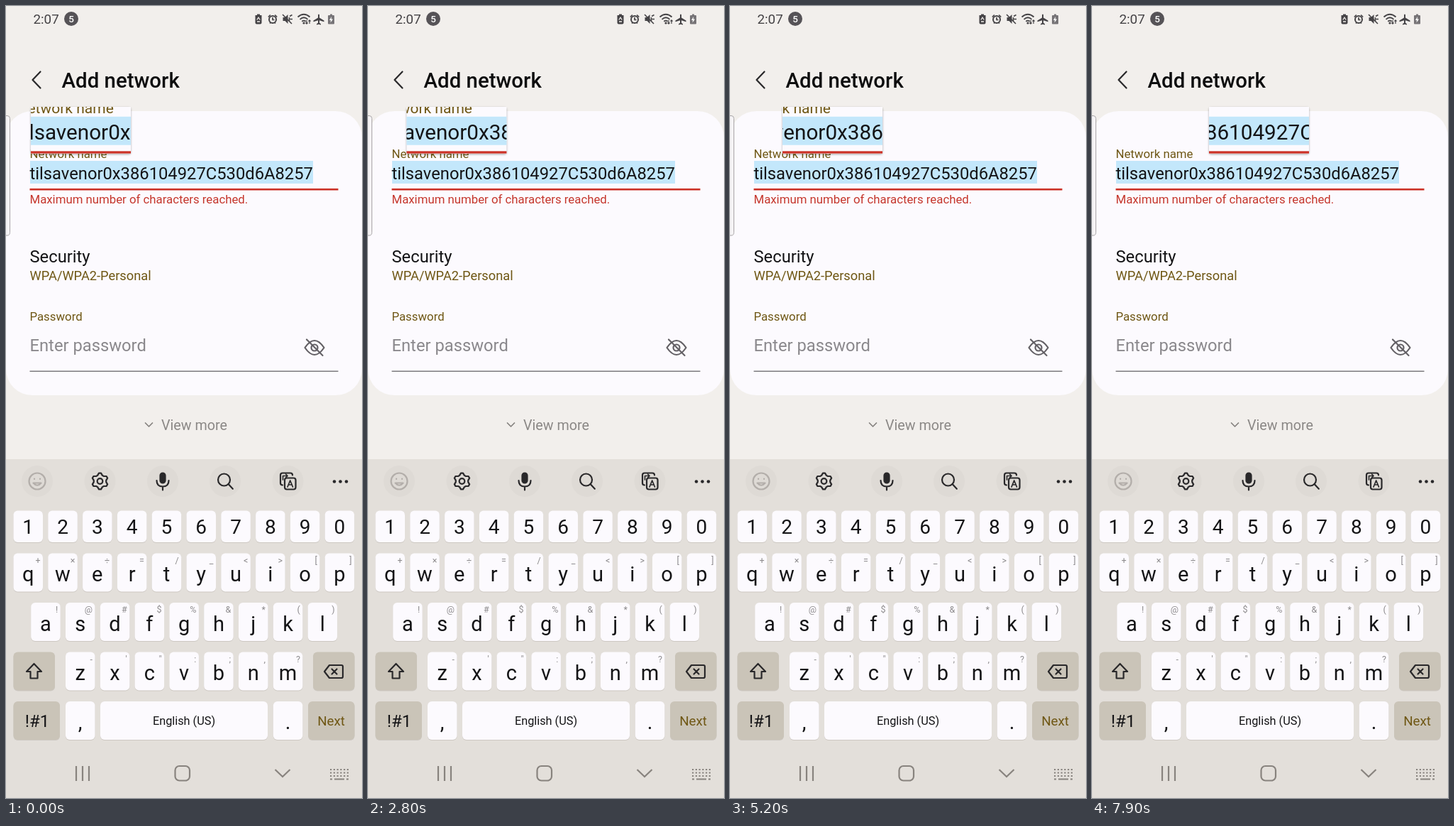
Recreate the animation shown at these times as an HTML page. Size 502 px wide and 1115 px high, loop 8 s.

```html
<!DOCTYPE html>
<html lang="en">
<head>
<meta charset="utf-8">
<title>Add network</title>
<style>
  html, body { margin: 0; width: 100%; height: 100%; overflow: hidden; background: #f2efec; }
  svg { display: block; }
  text { font-family: Roboto, "Noto Sans", sans-serif; fill: #141416; white-space: pre; }
  .mid { text-anchor: middle; }
  .gold { fill: #6f5714; }
  .line { fill: none; stroke: #29282a; stroke-width: 2.2; stroke-linecap: round; stroke-linejoin: round; }
  .thin { stroke-width: 1.7; }
  .nav { fill: none; stroke: #88837e; stroke-width: 2.2; }
  .hint { font-size: 12.5px; fill: #8d8b8d; text-anchor: end; }
  .big { font-size: 23.75px; }
  .small { font-size: 16.8px; }
</style>
</head>
<body>
<svg id="stage" width="502" height="1115" viewBox="0 0 502 1115">
  <defs>
    <filter id="blur" x="-10%" y="-20%" width="120%" height="140%"><feGaussianBlur stdDeviation="1.6"/></filter>
  </defs>
  <rect width="502" height="1115" fill="#f2efec"/>

  <!-- status bar -->
  <text x="38.5" y="24.5" font-size="18.8" style="fill:#454346">2:07</text>
  <circle cx="92" cy="18" r="10" fill="#565357"/>
  <text class="mid" x="92" y="23" font-size="13.5" font-weight="500" style="fill:#fff">5</text>
  <g fill="#454346">
    <path d="M354 11.5h4v2h-4zM351.5 13h9v10.5a2 2 0 0 1-2 2h-5a2 2 0 0 1-2-2z"/>
    <path d="M353.8 19.5l2.2-3.3 2.2 3.3M354 22h4" fill="none" stroke="#f2efec" stroke-width="1.3"/>
    <circle cx="376" cy="19" r="5" fill="none" stroke="#454346" stroke-width="2"/>
    <path d="M376 16v3.5h2.5M369.8 15.5l3-3M382.2 15.5l-3-3M372 24.5l1.5-1.5M380 24.5l-1.5-1.5" fill="none" stroke="#454346" stroke-width="1.7"/>
    <path d="M390.5 16h3l4-4v13l-4-4h-3z"/>
    <path d="M390 12l13 13M400 14.5l3.5-2M400.5 18.5h3.5M399.5 16v6" fill="none" stroke="#454346" stroke-width="1.6"/>
    <path d="M411.5 15.5q8.5-7.5 17 0M414.5 18.8q5.5-5 11 0M417.3 21.8q2.7-2.3 5.4 0" fill="none" stroke="#454346" stroke-width="1.8"/>
    <circle cx="420" cy="24" r="1.6"/>
    <path d="M424 20v5m-1.5-1.5l1.5 1.7 1.5-1.7M428 25v-5m-1.5 1.5l1.5-1.7 1.5 1.7" fill="none" stroke="#454346" stroke-width="1.2"/>
    <path d="M440 12.5c.5-1.5 1.5-1.5 2 0v4l6.5 4v1.7l-6.500-2v3.5l2 1.5v1.3l-3-.8-3 .8v-1.3l2-1.5v-3.5l-6.500 2v-1.7l6.500-4z"/>
    <path d="M457 11.5h3v1.5h2a1 1 0 0 1 1 1v10.5a1 1 0 0 1-1 1h-7a1 1 0 0 1-1-1V14a1 1 0 0 1 1-1h2z" fill="#777477"/>
    <path d="M459 15l-3 5h2l-.5 3.5 3.5-5h-2.3z" fill="#fff"/>
  </g>

  <!-- header and card -->
  <path class="line" d="M48.5 92.5L37.5 104l11 11.5"/>
  <text x="78.5" y="114.5" font-size="29.4" font-weight="500" style="fill:#0d0d0e">Add network</text>
  <rect y="148" width="502" height="400" rx="37" fill="#fcfafe"/>
  <path d="M-1 154.5h3q3.5 0 3.5 4v160q0 4.5-3.500 4.500h-3" fill="#f5f3f5" stroke="#a9a6a7"/>

  <g id="field">
    <text class="small gold" x="33.5" y="214">Network name</text>
    <rect x="34" y="218" width="399" height="32" fill="#c3e7fb"/>
    <text class="big" x="33.5" y="243.5">tilsavenor0x386104927C530d6A8257</text>
    <rect x="33.5" y="256.9" width="435" height="2.6" fill="#cb3026"/>
  </g>
  <text class="small" x="33.5" y="278" style="fill:#c5362c">Maximum number of characters reached.</text>

  <text class="big" x="33.5" y="360.7">Security</text>
  <text class="gold" x="33.5" y="386" font-size="18.25">WPA/WPA2-Personal</text>
  <text class="small gold" x="33.5" y="443">Password</text>
  <text class="big" x="33.5" y="486" style="fill:#8a888c">Enter password</text>
  <rect x="33.5" y="513.5" width="435" height="1.5" fill="#7d7b7f"/>
  <g class="line" style="stroke:#636065">
    <path d="M421.5 481q13.5-20 27 0q-13.5 20-27 0z"/>
    <circle cx="435" cy="481" r="4.5"/>
    <path d="M424 469.5l22.5 22.5"/>
  </g>
  <path class="line thin" d="M196.5 587l5 5 5-5" style="stroke:#85827f"/>
  <text x="219" y="597" font-size="19.7" style="fill:#8b8886">View more</text>

  <!-- keyboard -->
  <rect y="638" width="502" height="477" fill="#e3dfda"/>
  <g id="tools" fill="#dedad5"></g>
  <g class="line" style="stroke:#b3aeaa">
    <circle cx="44" cy="669" r="11.5"/><path d="M38.5 671.5q5.5 6.5 11 0z"/>
    <path d="M40 665.5v.5M48 665.5v.5"/>
  </g>
  <g class="line">
    <path id="gear"/>
    <circle cx="132.5" cy="669" r="3.8"/>
    <rect x="217.5" y="657.5" width="7" height="14" rx="3.5" fill="#29282a"/>
    <path d="M212.5 668q0 8.5 8.5 8.5t8.5-8.5M221 676.5v5"/>
    <circle cx="307.5" cy="667" r="8.5"/><path d="M313.8 673.3l6 6.5"/>
    <path d="M390 674.5q-3 0-3-3v-11q0-3 3-3h11q3 0 3 3"/>
    <rect x="393" y="664.5" width="15.5" height="16" rx="3"/>
    <path class="thin" d="M397 677l3.700-9 3.700 9M398.300 674h4.800M390.500 667v-5.500h6M394.500 659l2.500 2.500-2.500 2.500"/>
  </g>
  <g fill="#29282a"><circle cx="463" cy="669.5" r="2.3"/><circle cx="471.5" cy="669.5" r="2.3"/><circle cx="480" cy="669.5" r="2.3"/></g>
  <g id="keys"></g>
  <g class="line">
    <path d="M39.5 926l-10.5 11h5.5v9.5h10V937h5.5z"/>
    <path d="M456 928h17q2 0 2 2v14q0 2-2 2h-17l-7-9zM459.5 933.5l7 7M466.5 933.5l-7 7"/>
  </g>

  <!-- navigation -->
  <g class="nav">
    <path d="M99 1070v21M108 1070v21M117 1070v21"/>
    <rect x="238.5" y="1070" width="20.5" height="20.5" rx="6"/>
    <path d="M379.5 1075l10.5 10 10.5-10"/>
    <path d="M457 1075h26M457 1079.5h26M457 1084h26" stroke-dasharray="2.2 2.56"/>
    <path d="M457 1088.5h3M463 1088.5h14M480 1088.5h3"/>
  </g>

  <!-- magnifier -->
  <g id="mag">
    <rect x="0" y="143" width="141" height="66" rx="3" fill="#000" opacity=".32" filter="url(#blur)"/>
    <svg id="lens" y="142" width="141" height="66">
      <rect width="502" height="300" fill="#fcfafe"/>
      <use href="#field"/>
    </svg>
  </g>
</svg>
<script>
const $ = id => document.getElementById(id);
const esc = s => s.replace(/&/g, '&amp;').replace(/</g, '&lt;');

// keys
const PITCH = 48.8, DARK = '#cac4b8';
const box = (x, y, w, h, fill = '#fcfafe') =>
  `<rect x="${x}" y="${y + 1}" width="${w}" height="${h}" rx="6" fill="#cdc8c2"/>` +
  `<rect x="${x}" y="${y}" width="${w}" height="${h}" rx="6" fill="${fill}"/>`;
const label = (s, x, y, size, cls = 'mid') =>
  `<text class="${cls}" x="${x}" y="${y}" font-size="${size}">${esc(s)}</text>`;
const row = (chars, hints, x0, y, h, base, size) => [...chars].map((c, i) => {
  const x = x0 + i * PITCH;
  return box(x, y, 41.5, h) + label(c, x + 20.7, base, size) +
    (hints ? label(hints[i], x + 38, y + 14, 12.5, 'hint') : '');
}).join('');

$('keys').innerHTML =
  row('1234567890', '', 10.5, 710.5, 44.5, 743.3, 28) +
  row('qwertyuiop', '+×÷=/_<>[]', 10.5, 770.5, 54, 810.3, 29) +
  row('asdfghjkl', '!@#$%&*()', 35.2, 840, 54, 879.8, 29) +
  row('zxcvbnm', '-\'":;,?', 84, 909.5, 54, 949.3, 29) +
  row(',', '', 84, 979, 54, 1018, 29) +
  row('.', '', 376.8, 979, 54, 1018, 29) +
  box(10.5, 909.5, 58.5, 54, DARK) + box(433, 909.5, 58.5, 54, DARK) +
  box(10.5, 979, 65.5, 54, DARK) + label('!#1', 44, 1015, 24) +
  box(133, 979, 236, 54) + label('English (US)', 251, 1012, 16.3) +
  box(426, 979, 65.5, 54, DARK) + label('Next', 458.6, 1013.3, 18.8, 'mid gold');

$('tools').innerHTML = [44, 132.5, 221, 309, 397.5]
  .map(x => `<circle cx="${x}" cy="669" r="22"/>`).join('');

// gear outline: six teeth, one pointing up
const gear = [];
for (let i = 0; i < 24; i++) {
  const a = (i - 0.5) * Math.PI / 12 - Math.PI / 2, r = i % 4 < 2 ? 11.5 : 8.8;
  gear.push((132.5 + r * Math.cos(a)).toFixed(1) + ' ' + (669 + r * Math.sin(a)).toFixed(1));
}
$('gear').setAttribute('d', 'M' + gear.join('L') + 'z');

// left edge of the magnifier: [ms, x]
const path = [
  [0, 35], [250, 5], [350, 5], [1200, 136], [1800, 38], [2000, 5], [2400, 5], [2700, 38],
  [3400, 153], [3600, 186], [4500, 316], [5400, 5], [5700, 5], [6200, 55],
  [6600, 83], [6900, 5], [7000, 5], [7900, 165], [8000, 165]
];
const ZOOM = 1.25, LOOP = 8000, STEP = 100;

function edge(t) {
  const i = path.findIndex(p => p[0] > t);
  const [t0, x0] = path[i - 1], [t1, x1] = path[i];
  return x0 + (x1 - x0) * (t - t0) / (t1 - t0);
}

function draw(now) {
  const t = Math.floor(now % LOOP / STEP) * STEP;
  const x = edge(t), w = 141 / ZOOM, h = 66 / ZOOM;
  const from = Math.max(24.8, x + 70.5 - w / 2);
  $('mag').setAttribute('transform', `translate(${x} 0)`);
  $('lens').setAttribute('viewBox', `${from} 207 ${w} ${h}`);
}

const start = performance.now();
function tick() {
  draw(performance.now() - start);
  requestAnimationFrame(tick);
}
tick();
</script>
</body>
</html>
```
